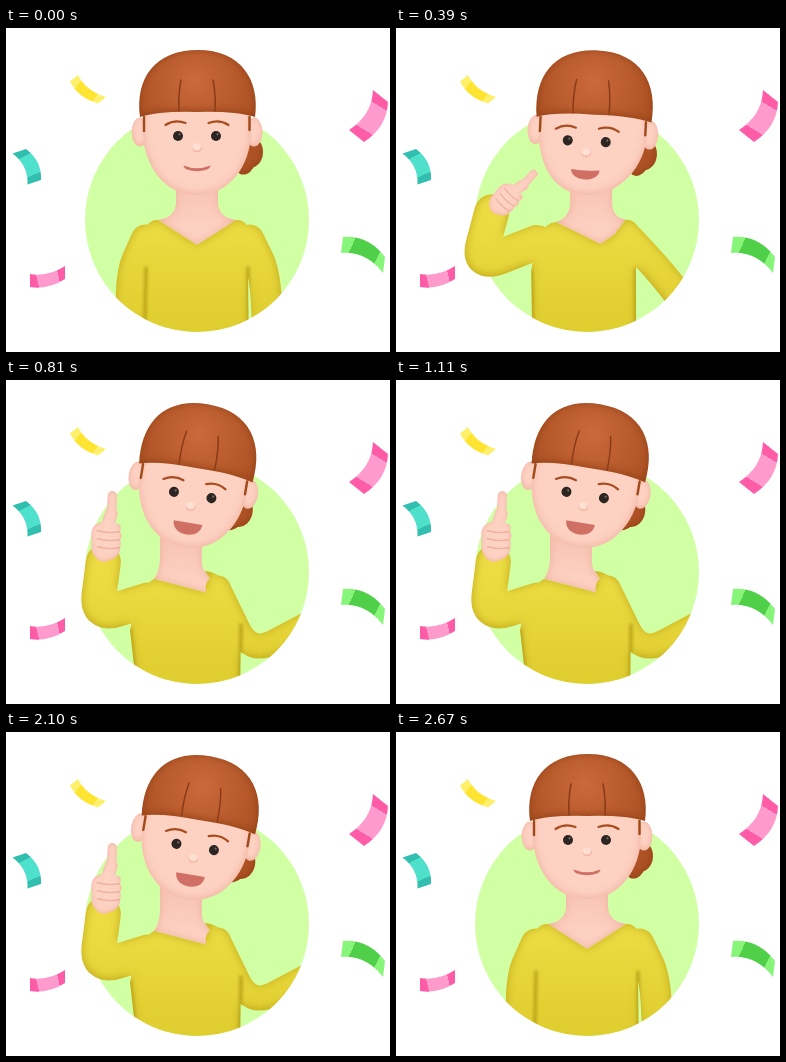
Write an HTML page with a canvas that moves like this. It is 384 px wide and 324 px high and loops after 2700 ms.

```html
<!DOCTYPE html>
<html lang="en">
<head>
<meta charset="utf-8">
<title>Thumbs up</title>
<style>
html, body { margin: 0; width: 100%; height: 100%; overflow: hidden; background: #fff; }
canvas { display: block; }
</style>
</head>
<body>
<canvas id="stage" width="384" height="324"></canvas>
<script>
const W = 384, H = 324, LOOP = 2700, STEP = 30, TAU = Math.PI * 2, DEG = Math.PI / 180;
const SKIN = '#fdd2c3', SKIN_RIM = '#f1b09e', HAIR = '#ae5224', HAIR_RIM = '#934114';
const WOOL_RIM = '#bea517';

const ctx = document.getElementById('stage').getContext('2d');
const layer = () => {
  const c = document.createElement('canvas');
  c.width = W;
  c.height = H;
  return c.getContext('2d');
};
const shape = layer(), rim = layer();

// Motion: a few drivers from 0 to 1, everything else follows from them
const mix = (a, b, k) => a + (b - a) * k;
const span = (t, from, to) => Math.min(1, Math.max(0, (t - from) / (to - from)));
const ease = (t, from, to) => { const u = span(t, from, to); return u * u * (3 - 2 * u); };
const bump = (t, from, to) => Math.sin(Math.PI * span(t, from, to)) ** 2;

function drivers(t) {
  const back = 1 - ease(t, 2100, 2670);
  return {
    lift: ease(t, 0, 420) * back,        // thumb arm
    lean: ease(t, 150, 810) * back,      // body and head tilt
    settle: ease(t, 810, 1110) * back,
    sway: bump(t, 0, 810),               // shoulders swing on the way up
    hop: bump(t, 2160, 2670)             // little bounce on the way back
  };
}

const polar = ([x, y], angle, length) =>
  [x + Math.cos(angle * DEG) * length, y + Math.sin(angle * DEG) * length];

function bodyPose({ lift, lean, sway, hop }) {
  const at = (x0, y0, x1, y1) => [mix(x0, x1, lean), mix(y0, y1, lean)];
  const upper = (...p) => { const [x, y] = at(...p); return [x + 9 * sway, y - 4 * hop]; };
  return {
    neck: mix(191, 175, lean) + 9 * sway + 4 * hop,
    collarL: upper(152, 192, 148, 199),
    vee: upper(191, 217, 206, 214),
    notch: upper(210, 205, 210, 208),
    collarR: upper(230, 192, 199, 191),
    shoulderR: upper(251, 191, 225, 192),
    shoulderL: upper(131, 191, 133, 206),
    sideR: at(242, 240, 235, 245),
    sideL: at(140, 240, 124, 250),
    hemR: at(243, 330, 234, 330),
    hemL: at(138, 330, 133, 330),
    arms: [leftArm(at(140, 212, 142, 220), lift, sway), rightArm(at(243, 212, 212, 208), lean, sway)]
  };
}

// The forearm swings up towards the viewer, so its length is foreshortened
function leftArm(shoulder, lift, sway) {
  const swing = lift * lift, turn = Math.PI * swing;
  const elbow = polar(shoulder, mix(114, 163, lift) - 4 * sway, mix(36, 54, lift) + 10 * sway);
  const wrist = [
    elbow[0] + 7 * swing + 9 * sway - 15 * Math.sin(turn),
    elbow[1] + mix(66, 54, swing) * Math.cos(turn)
  ];
  return { shoulder, elbow, wrist, width: mix(31, 35, lift), up: -Math.cos(turn) };
}

function rightArm(shoulder, lean, sway) {
  const elbow = polar(shoulder, 64 - 17 * sway, mix(36, 74, lean));
  const wrist = polar(elbow, mix(87, -28, lean), 66);
  return { shoulder, elbow, wrist, width: mix(31, 25, lean) };
}

// Draws a soft, rounded form: flat shape plus a blurred rim inside it
function clay(draw, edge, blur, lift = 1) {
  for (const g of [shape, rim]) { g.resetTransform(); g.clearRect(0, 0, W, H); }
  shape.save();
  draw(shape);
  shape.restore();
  rim.fillStyle = edge;
  rim.fillRect(0, 0, W, H);
  rim.globalCompositeOperation = 'destination-out';
  rim.drawImage(shape.canvas, 0, 0);
  rim.globalCompositeOperation = 'source-over';
  shape.save();
  shape.globalCompositeOperation = 'source-atop';
  shape.filter = `blur(${blur}px)`;
  shape.drawImage(rim.canvas, 0, -lift);
  shape.restore();
  ctx.drawImage(shape.canvas, 0, 0);
}

function fill(g, path, color) {
  g.fillStyle = color;
  g.fill(new Path2D(path));
}

function line(g, path, color, width) {
  g.strokeStyle = color;
  g.lineWidth = width;
  g.lineCap = g.lineJoin = 'round';
  g.stroke(new Path2D(path));
}

function oval(g, x, y, rx, ry, color, turn = 0) {
  g.fillStyle = color;
  g.beginPath();
  g.ellipse(x, y, rx, ry, turn, 0, TAU);
  g.fill();
}

function fade(g, y0, y1, from, to) {
  const tone = g.createLinearGradient(0, y0, 0, y1);
  tone.addColorStop(0, from);
  tone.addColorStop(1, to);
  return tone;
}

function limb(g, { shoulder, elbow, wrist, width }, color) {
  const between = (a, b, k) => [mix(a[0], b[0], k), mix(a[1], b[1], k)];
  line(g, `M${shoulder} L${between(shoulder, elbow, 0.6)}
    Q${elbow} ${between(elbow, wrist, 0.4)} L${wrist}`, color, width);
}

// Ribbon: a curve swept along a short vector, with folded ends
function ribbon([x, y], [bx, by], [ex, ey], [dx, dy], ends, middle) {
  const g = ctx.createLinearGradient(x + dx / 2, y + dy / 2, ex + dx / 2, ey + dy / 2);
  [[0, ends], [0.2, ends], [0.2, middle], [0.8, middle], [0.8, ends], [1, ends]]
    .forEach(([at, color]) => g.addColorStop(at, color));
  fill(ctx, `M${x},${y} Q${bx},${by} ${ex},${ey} l${dx},${dy}
    Q${bx + dx},${by + dy} ${x + dx},${y + dy}Z`, g);
}

function confetti() {
  const pink = ['#ff5ca7', '#ff9acd'];
  ribbon([72, 47], [80, 63], [100, 69], [-8, 6.5], '#fff06c', '#ffe432');
  ribbon([20, 121], [36, 133], [35, 152], [-13.5, 4.5], '#30bfae', '#4fe0cc');
  ribbon([24, 246], [42, 249], [59, 238], [0, 13], ...pink);
  ribbon([367, 62], [366, 87], [343, 102], [15, 12], ...pink);
  ribbon([337, 209], [362, 207], [379, 229], [-2, 16], '#86f57a', '#50cf48');
}

function neck({ neck: x, collarL, vee, notch, collarR }) {
  clay(g => fill(g, `M${x - 21},140 V172 Q${x - 20},189 ${collarL} L${vee}
    L${notch} L${collarR} Q${x + 20},189 ${x + 21},172 V140Z`,
    fade(g, 160, 205, '#f8c4b4', SKIN)), SKIN_RIM, 4, 0);
}

function sweater(b) {
  clay(g => {
    const tone = fade(g, 195, 300, '#ecdc42', '#e0cd2f');
    for (const arm of b.arms) limb(g, arm, tone);
    fill(g, `M${b.collarL} L${b.vee} L${b.notch} L${b.collarR} Q${b.shoulderR} ${b.sideR}
      L${b.hemR} L${b.hemL} L${b.sideL} Q${b.shoulderL} ${b.collarL}Z`, tone);
    g.globalCompositeOperation = 'source-atop';
    g.filter = 'blur(1.8px)';
    line(g, `M${b.sideL} L${b.hemL} M${b.sideR} L${b.hemR}`, WOOL_RIM, 3.5);
  }, WOOL_RIM, 5);
}

function hand({ wrist, up }, sway) {
  const size = 1 - 0.15 * sway;
  clay(g => {
    g.translate(...wrist);
    g.rotate(40 * sway * DEG);
    g.scale(size, size * up);
    line(g, 'M1,-11 L2,-18', SKIN, 22);
    line(g, 'M2,-30 L8,-48', SKIN, 13);
    line(g, 'M8,-46 L9,-66', SKIN, 9.5);
    g.fillStyle = SKIN;
    g.beginPath();
    g.roundRect(-12, -40, 29, 38, 12);
    g.fill();
    for (let i = 0; i < 4; i++) line(g, `M2,${-34 + i * 8} h${12 - (i - 1) ** 2 * 0.8}`, SKIN, 8.5);
    for (let i = 0; i < 3; i++) line(g, `M-6,${-31 + i * 8} q10,3 22,1`, '#efb09d', 1.4);
  }, SKIN_RIM, 2.5, 0.5);
}

function head({ lift, lean, settle, sway, hop }) {
  const lookX = lean - 6 * sway, lookY = 5 * lift + lean + 3.5 * hop;
  const open = (lift + lean) / 2, fringe = lookY * 0.45 - 11;
  const place = g => {
    g.translate(191 - 3 * lean + 7 * sway + 4 * hop + 2.5 * settle, 100 + lean - 8 * hop);
    g.rotate(9.5 * lean * DEG);
  };
  const part = (draw, edge, blur) => clay(g => { place(g); draw(g); }, edge, blur);

  part(g => {
    oval(g, 53 - 3 * lean, 24 - 2 * lean, 13, 16, HAIR);
    oval(g, 48 - 4 * lean, 36 - 4 * lean, 9, 11, HAIR, 0.5);
  }, HAIR_RIM, 4);
  part(g => {
    for (const side of [-57, 57]) oval(g, side, 4, 8.5, 14.5, SKIN);
  }, SKIN_RIM, 3);
  part(g => {
    const chin = lookX * 0.8;
    fill(g, `M-54,-30 L-54,6 C-53,36 ${chin - 34},67 ${chin},67
      C${chin + 34},67 53,36 54,6 L54,-30Z`, SKIN);
  }, SKIN_RIM, 5);

  ctx.save();
  place(ctx);
  line(ctx, `M-53,${fringe} v14 M52.5,${fringe} v13`, '#a04919', 2.4);
  ctx.restore();

  part(g => {
    const tone = g.createRadialGradient(-2, -48, 4, -2, -42, 62);
    tone.addColorStop(0, '#c9683a');
    tone.addColorStop(1, HAIR);
    fill(g, `M-57,${fringe} C-62,-50 -42,-78 1,-78 C44,-78 63,-48 58,${fringe}
      Q38,${fringe - 6} 0,${fringe - 5} Q-38,${fringe - 6} -57,${fringe}Z`, tone);
    for (const side of [-1, 1]) {
      const x = lookX / 2 + side * 16;
      line(g, `M${x},-48 Q${x + side * 3},-33 ${x + side * 2},${fringe - 6}`, '#8a3b16', 1.5);
    }
  }, HAIR_RIM, 4);

  ctx.save();
  place(ctx);
  ctx.translate(lookX, lookY);
  for (const side of [-1, 1]) {
    line(ctx, `M${side * 11.5},-5 Q${side * 22},-9 ${side * 31.5},-3`, '#a94d20', 2.2);
    oval(ctx, side * 19, 8, 5, 5.1, '#2c2522');
    oval(ctx, side * 19 + 1.5, 6.3, 1.1, 1.1, '#756a66');
  }
  oval(ctx, 0, 20, 5, 4.2, '#f5b7a5');
  oval(ctx, -0.3, 18.8, 4.4, 3.6, '#ffdfd2');
  const corner = 37.5 - 1.5 * open, low = mix(45, 52, open), half = 13.5 + open;
  fill(ctx, `M${-half},${corner} Q0,${mix(43, 36, open)} ${half},${corner}
    C${half},${low} ${-half},${low} ${-half},${corner}Z`, '#d06f64');
  ctx.restore();
}

function render(t) {
  const move = drivers(t), body = bodyPose(move);

  ctx.fillStyle = '#fff';
  ctx.fillRect(0, 0, W, H);
  oval(ctx, 191, 192, 112, 112, '#d1ffa3');
  confetti();

  // The disc cuts the body off below; the raised arm may leave it
  const mask = new Path2D();
  mask.arc(191, 192, 112, 0, TAU);
  mask.rect(0, 0, W, 192);
  mask.rect(0, 0, 150, mix(192, 257, move.lift));
  ctx.save();
  ctx.clip(mask);
  neck(body);
  sweater(body);
  head(move);
  hand(body.arms[0], move.sway);
  ctx.restore();
}

let shown = -1;
const start = performance.now();
function tick(now) {
  const t = Math.floor((Math.max(0, now - start) % LOOP) / STEP) * STEP;
  if (t !== shown) render(shown = t);
  requestAnimationFrame(tick);
}
render(0);
requestAnimationFrame(tick);
</script>
</body>
</html>
```
